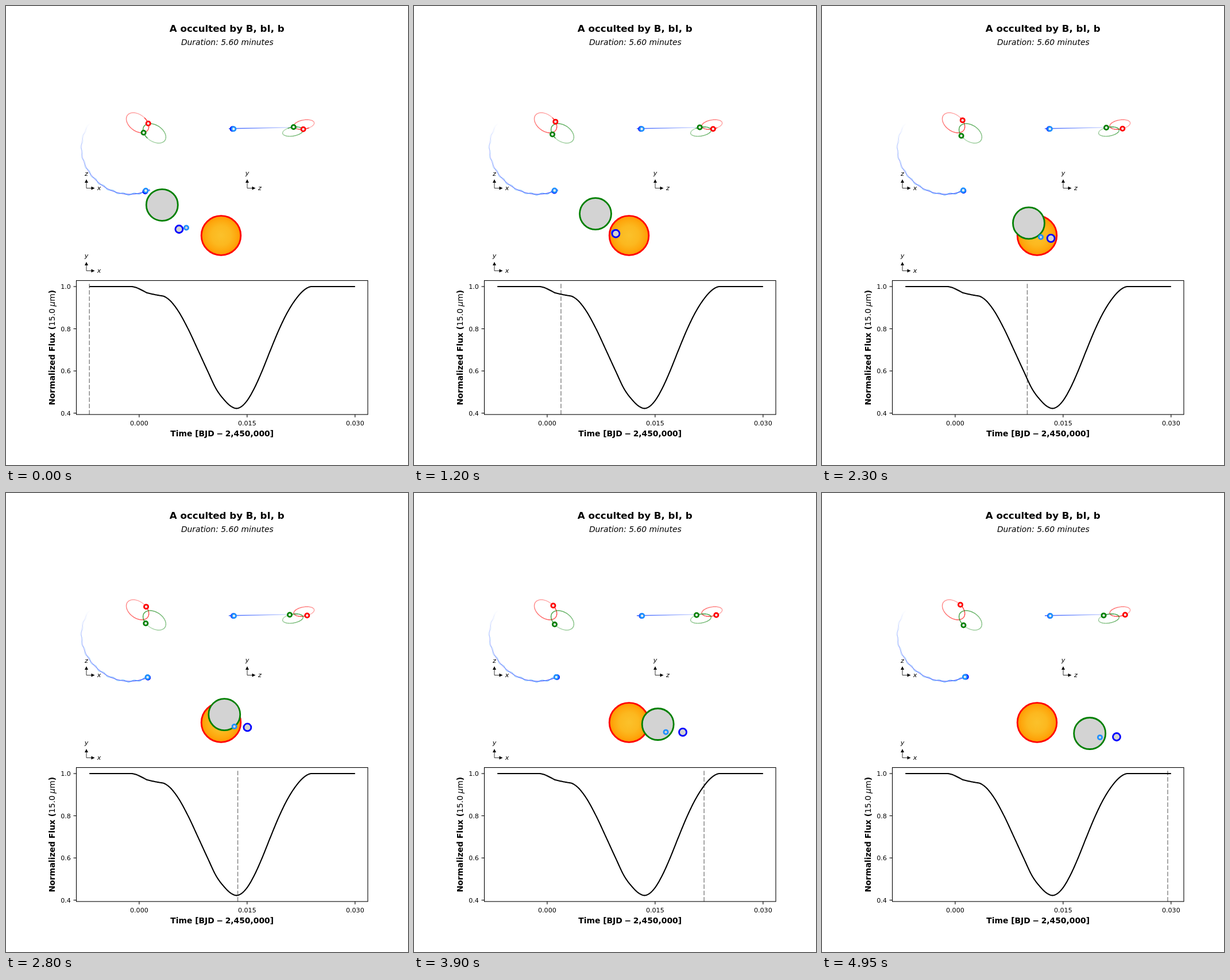
An HTML page for the animation above (5000 ms loop, 700 by 800 pixels).

```html
<!DOCTYPE html>
<html lang="en">
<head>
<meta charset="utf-8">
<title>Occultation</title>
<style>
html, body { margin: 0; width: 100%; height: 100%; overflow: hidden; background: #fff; }
svg { display: block; width: 700px; height: 800px; }
text { font-family: "DejaVu Sans", sans-serif; font-size: 11.11px; }
.mid { text-anchor: middle; }
.label { font-size: 13.89px; font-weight: bold; }
.it { font-style: italic; }
.reg { font-weight: normal; }
</style>
</head>
<body>
<svg id="stage" viewBox="0 0 700 800">
  <defs>
    <radialGradient id="sun">
      <stop offset="0" stop-color="#fbc12b"/>
      <stop offset=".5" stop-color="#fcb81f"/>
      <stop offset=".82" stop-color="#fea60c"/>
      <stop offset="1" stop-color="#ff9400"/>
    </radialGradient>
    <linearGradient id="fade" gradientUnits="userSpaceOnUse" x1="388" y1="0" x2="514" y2="0">
      <stop offset="0" stop-color="#2450ff" stop-opacity=".9"/>
      <stop offset="1" stop-color="#2450ff" stop-opacity="0"/>
    </linearGradient>
  </defs>
  <text class="mid" x="384.8" y="45" style="font-size:16.67px;font-weight:bold">A occulted by B, bI, b</text>
  <text class="mid it" x="385.3" y="68" style="font-size:13.89px">Duration: 5.60 minutes</text>
  <g id="trails" fill="none"></g>
  <g id="axes"></g>
  <g id="bodies"></g>
  <g id="plot"></g>
  <text class="mid label" x="376.2" y="750">Time [BJD<tspan dx="3.6">−</tspan><tspan dx="3.6">2,450,000]</tspan></text>
  <text class="mid label" transform="translate(85 595.4) rotate(-90)">Normalized Flux (<tspan class="reg">15.0</tspan><tspan class="reg it" dx="3.4">μ</tspan><tspan class="reg">m</tspan>)</text>
</svg>
<script>
const NS = "http://www.w3.org/2000/svg";
const STEP = 50, COUNT = 100;
const RED = "#f00", GREEN = "#008000", BLUE = "#00f", SKY = "#1e90ff", GRAY = "#d3d3d3";
const rad = d => d * Math.PI / 180;
const cosd = d => Math.cos(rad(d));
const group = id => document.getElementById(id);

function add(parent, tag, attrs, text) {
  const el = document.createElementNS(NS, tag);
  for (const k in attrs) el.setAttribute(k, attrs[k]);
  if (text) el.textContent = text;
  return parent.appendChild(el);
}

// Smooth cubic through the points (xs, ys)
function spline(xs, ys) {
  const n = xs.length - 1;
  const sec = i => (ys[i + 1] - ys[i]) / (xs[i + 1] - xs[i]);
  const slope = xs.map((x, i) => {
    if (i === 0) return n > 1 ? 1.5 * sec(0) - .5 * sec(1) : sec(0);
    if (i === n) return n > 1 ? 1.5 * sec(n - 1) - .5 * sec(n - 2) : sec(n - 1);
    const a = xs[i] - xs[i - 1], b = xs[i + 1] - xs[i];
    return (sec(i - 1) * b + sec(i) * a) / (a + b);
  });
  return x => {
    let i = 0;
    while (i < n - 1 && x > xs[i + 1]) i++;
    const h = xs[i + 1] - xs[i], t = (x - xs[i]) / h, t2 = t * t, t3 = t2 * t;
    return (2 * t3 - 3 * t2 + 1) * ys[i] + (t3 - 2 * t2 + t) * h * slope[i]
      + (3 * t2 - 2 * t3) * ys[i + 1] + (t3 - t2) * h * slope[i + 1];
  };
}

// Orbits of the two stars, seen along y and along x
const topView = (cx, cy, a, b) => t => [cx + a * cosd(t), cy + b * cosd(t - 67.5)];
const sideView = (cx, cy, a, b) => t => [cx - a * cosd(t - 67.5), cy + b * cosd(t + 5)];
const orbits = [
  { color: RED, at: topView(229.1, 203.5, 19.6, 17.5) },
  { color: GREEN, at: topView(258.5, 222, -19.9, -17) },
  { color: RED, at: sideView(518.9, 206.6, 17.8, 8.4) },
  { color: GREEN, at: sideView(499.5, 218.9, -17.9, -8.2) }
];
const phase = i => -18.4 - .45 * i + .00105 * i * i;

// A path in short pieces whose opacity runs from a0 to a1
function trail(at, from, to, n, color, width, a0, a1) {
  for (let k = 0; k < n; k++) {
    const p = at(from + (to - from) * k / n), q = at(from + (to - from) * (k + 1) / n);
    add(group("trails"), "path", {
      d: `M${p[0].toFixed(2)} ${p[1].toFixed(2)}L${q[0].toFixed(2)} ${q[1].toFixed(2)}`,
      stroke: color, "stroke-width": width, "stroke-opacity": (a0 + (a1 - a0) * k / n).toFixed(3)
    });
  }
}

const radius = spline([62, 90, 130, 180, 213], [84.4, 83, 80.7, 80.6, 77.5]);
const arc = wave => a => {
  const r = radius(a) + wave * cosd((a - 89) * 360 / 13);
  return [212 + r * cosd(a), 245 + r * Math.sin(rad(a))];
};
trail(arc(0), 213, 62.9, 70, BLUE, 1.3, 0, .75);
trail(arc(1.6), 213, 62.9, 140, SKY, 1.3, 0, .75);
add(group("trails"), "path", { d: "M388 213.8L514 211.3", stroke: "url(#fade)", "stroke-width": 1.6 });
for (const o of orbits) trail(o.at, phase(99) + 360, phase(99), 72, o.color, 1.4, .3, .9);

// Small direction arrows
function compass(x, y, up, right) {
  const g = add(group("axes"), "g", { transform: `translate(${x} ${y})` });
  add(g, "path", { d: "M0-10V0H10", fill: "none", stroke: "#000", "stroke-width": .8 });
  add(g, "path", { d: "M-3-9.5L0-15.5L3-9.5ZM8.5-3L14.5 0L8.5 3Z" });
  add(g, "text", { class: "mid it", x: 0, y: up === "y" ? -23 : -22 }, up);
  add(g, "text", { class: "mid it", x: 22, y: 3.5 }, right);
}
compass(140, 317.5, "z", "x");
compass(420, 317.5, "y", "z");
compass(140, 461.5, "y", "x");

// Light curve
const plot = group("plot");
const cursor = add(plot, "path", {
  d: "M0 712V481.5", fill: "none", stroke: "#000", "stroke-opacity": .5,
  "stroke-width": 1.4, "stroke-dasharray": "7.7 3.3"
});
const parts = [
  [[219, 226, 235, 245], [489, 490.5, 494.5, 499.8]],
  [[245, 258, 274], [499.8, 502.8, 505.6]],
  [[274, 285, 297.5, 317, 334, 351, 366, 380, 392, 401.5, 411, 420, 433, 446, 460, 476, 490, 505, 518, 526, 531],
   [505.6, 512.8, 528, 562.6, 599, 636, 667.5, 686.5, 697.8, 701.4, 697.3, 687.5, 665, 636, 601, 562.6, 534, 510.5, 496, 490.6, 489]]
];
let d = "M145.2 489H219";
for (const [xs, ys] of parts) {
  const f = spline(xs, ys), end = xs[xs.length - 1];
  for (let x = xs[0] + 1; x <= end; x++) d += `L${x} ${f(x).toFixed(2)}`;
}
add(plot, "path", { d: d + "H607.8", fill: "none", stroke: "#000", "stroke-width": 2.08, "stroke-linejoin": "round" });
add(plot, "rect", { x: 122.5, y: 478.5, width: 507.5, height: 233.5, fill: "none", stroke: "#000", "stroke-width": 1.1 });
["1.0", "0.8", "0.6", "0.4"].forEach((s, k) => {
  const y = 489 + k * 73.53;
  add(plot, "path", { d: `M122.5 ${y}h-5`, stroke: "#000", "stroke-width": 1.1 });
  add(plot, "text", { x: 112.8, y: y + 4.2, "text-anchor": "end" }, s);
});
["0.000", "0.015", "0.030"].forEach((s, k) => {
  const x = 231.9 + k * 187.95;
  add(plot, "path", { d: `M${x} 712v5`, stroke: "#000", "stroke-width": 1.1 });
  add(plot, "text", { class: "mid", x, y: 731 }, s);
});

// Moving bodies
const disc = (r, stroke, fill, w) => add(group("bodies"), "circle", { r, stroke, fill, "stroke-width": w });
const dot = c => disc(3.6, c, "#eee", 2.8);
const put = (el, [x, y]) => {
  el.setAttribute("cx", x.toFixed(2));
  el.setAttribute("cy", y.toFixed(2));
};
const line = (x0, y0, x1, y1) => i => [x0 + (x1 - x0) * i / 99, y0 + (y1 - y0) * i / 99];
const keys = [0, 16, 33, 46, 66, 89, 99];
const track = (xs, ys) => {
  const fx = spline(keys, xs), fy = spline(keys, ys);
  return i => [fx(i), fy(i)];
};

put(disc(34.3, RED, "url(#sun)", 2.8), [374.5, 400]);
const movers = [
  [disc(27.5, GREEN, GRAY, 2.8),
    track([271.8, 300.6, 333.8, 360, 400.5, 446.6, 466.2], [346.8, 356.6, 368.6, 378.4, 393.8, 411.4, 419])],
  [disc(3.6, SKY, GRAY, 2.8),
    track([314, 336.4, 361.3, 381, 415.6, 461.4, 484], [386.5, 391.6, 397.8, 402.7, 411.5, 421.4, 425.9])],
  [disc(6.5, BLUE, GRAY, 2.8),
    track([301.4, 334.4, 370.7, 398.6, 442.2, 491.6, 513], [389, 394, 400, 404.8, 412.2, 421.2, 425])],
  ...orbits.map(o => [dot(o.color), i => o.at(phase(i))]),
  [dot(BLUE), line(242.5, 323.2, 250.7, 320.5)],
  [dot(SKY), line(243.4, 321.7, 248.9, 320.6)],
  [dot(BLUE), line(394.6, 214.3, 397, 214.2)],
  [dot(SKY), line(396.3, 214.2, 397.4, 214.1)]
];

function draw(ms) {
  const i = Math.floor(ms / STEP) % COUNT;
  for (const [el, at] of movers) put(el, at(i));
  cursor.setAttribute("transform", `translate(${(145.2 + i * 4.614).toFixed(2)} 0)`);
}

const start = performance.now();
function tick() {
  draw(performance.now() - start);
  requestAnimationFrame(tick);
}
draw(0);
requestAnimationFrame(tick);
</script>
</body>
</html>
```
